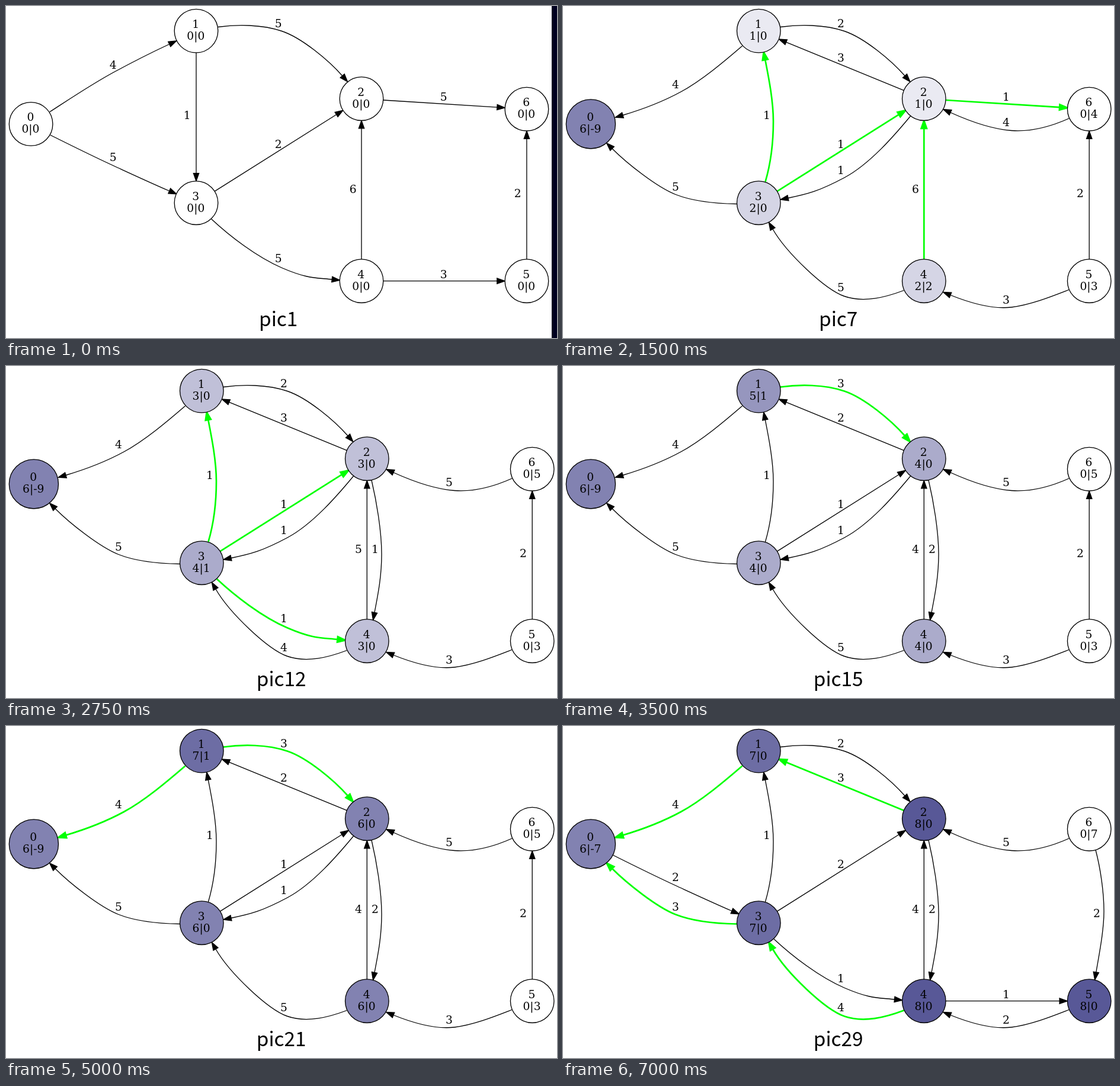
Write an HTML page with a canvas that moves like this. It is 930 px wide and 561 px high and loops after 7250 ms.

```html
<!DOCTYPE html>
<html lang="en">
<head>
<meta charset="utf-8">
<title>Push-relabel maximum flow</title>
<style>
  html, body { margin: 0; height: 100%; overflow: hidden; background: #fff; }
  canvas { display: block; }
</style>
</head>
<body>
<canvas id="stage" width="930" height="561"></canvas>
<script>
const ctx = document.getElementById('stage').getContext('2d');
const STEP = 250, RADIUS = 36.8, HEAD = 13.33;
const NODE_FONT = '18.67px "DejaVu Serif", "Noto Serif", serif';
const TITLE_FONT = '33.33px "Noto Sans CJK SC", "Noto Sans CJK JP", "Noto Sans", sans-serif';

const nodes = [[46.9, 199.4], [330.3, 42.1], [609.3, 156.7], [330.3, 332.7],
               [609.3, 464.7], [888.2, 464.7], [888.2, 174.2]];

// from, to, capacity, label position, label position of the reverse arc
const edges = [
  [0, 1, 4, 190, 100, 190, 133],
  [0, 3, 5, 190, 256, 190, 306],
  [1, 2, 5, 469, 30, 469, 88],
  [1, 3, 1, 315, 185, 344, 185],
  [2, 6, 5, 748, 154, 748, 197],
  [3, 2, 2, 469, 234, 469, 278],
  [3, 4, 5, 469, 427, 469, 476],
  [4, 2, 6, 595, 310, 623, 310],
  [4, 5, 3, 748, 454, 748, 497],
  [5, 6, 2, 873, 317, 901, 317]
];

// Arcs that are not straight lines between their nodes
const curves = {
  '0-1': 'M83 179 C114 159 154 132 191 112 S256 78 285 64.5',
  '0-3': 'M84 218 C114 233 154 253 191 270 S256 300 285 312.5',
  '1-0': 'M302.5 67.5 C273 93 234 126 199 145 S133 175 101 184.5',
  '3-0': 'M293 334.5 C260 334 222 331 190 318.5 S107 265 83 241',
  '1-2': 'M367 35.5 C400 31 441 31 475 42.5 S554 92 577 118',
  '3-1': 'M341.5 297 C350 268 355 230 355 195 S347 120 341.3 91',
  '2-3': 'M586.5 186 C560 218 518 267 475 290 S412 318 380 324.5',
  '3-4': 'M356 360 C386 388 432 424 475 442.5 S531 459 559.5 462',
  '4-3': 'M575.5 480.5 C545 492 508 502 475 490.5 S377 417 354 377',
  '2-4': 'M617 193 C625 227 634 278 634 318 S627 390 622 416.5',
  '5-4': 'M854 479.5 C827 490 790 505 757 509 S685 501 654 488.5',
  '6-2': 'M854 190 C825 203 791 213 757 210.5 S685 194 654 180',
  '6-5': 'M899 209.5 C907 240 913 280 913 313 S905 385 899.8 416'
};

function straight(u, v) {
  const [x1, y1] = nodes[u], [x2, y2] = nodes[v];
  const length = Math.hypot(x2 - x1, y2 - y1);
  const at = d => `${x1 + (x2 - x1) * d / length} ${y1 + (y2 - y1) * d / length}`;
  return `M${at(RADIUS)} L${at(length - RADIUS - HEAD)}`;
}

function makeArc(u, v, x, y) {
  const d = curves[`${u}-${v}`] || straight(u, v);
  const [px, py, ex, ey] = d.match(/[\d.]+/g).slice(-4).map(Number);
  const length = Math.hypot(ex - px, ey - py);
  const dx = (ex - px) / length, dy = (ey - py) / length, w = 0.35 * HEAD;
  const head = new Path2D(`M${ex - dy * w} ${ey + dx * w} L${ex + dx * HEAD} ${ey + dy * HEAD}
    L${ex + dy * w} ${ey - dx * w} Z`);
  return { u, v, x, y, line: new Path2D(d), head };
}

const arcs = edges.flatMap(([u, v, , x, y, bx, by]) => [makeArc(u, v, x, y), makeArc(v, u, bx, by)]);

// Relabel-to-front push-relabel; a state is kept at the start, at each relabel and at the end
function solve() {
  const height = nodes.map(() => 0), excess = nodes.map(() => 0);
  const residual = edges.flatMap(e => [e[2], 0]);
  const states = [];
  const save = () => states.push({ height: [...height], excess: [...excess], residual: [...residual] });
  const leaving = u => arcs.map((_, i) => i).filter(i => arcs[i].u === u).reverse();

  function push(i, amount) {
    residual[i] -= amount;
    residual[i ^ 1] += amount;
    excess[arcs[i].u] -= amount;
    excess[arcs[i].v] += amount;
  }

  function discharge(u) {
    while (excess[u] > 0) {
      const open = () => leaving(u).filter(i => residual[i] > 0);
      for (const i of open())
        if (excess[u] > 0 && height[u] === height[arcs[i].v] + 1) push(i, Math.min(excess[u], residual[i]));
      if (excess[u] > 0) {
        height[u] = 1 + Math.min(...open().map(i => height[arcs[i].v]));
        save();
      }
    }
  }

  save();
  height[0] = 6;
  leaving(0).forEach(i => push(i, residual[i]));
  const list = [1, 2, 3, 4, 5];
  for (let k = 0; k < list.length; k++) {
    const u = list[k], before = height[u];
    discharge(u);
    if (height[u] > before) {
      list.splice(k, 1);
      list.unshift(u);
      k = 0;
    }
  }
  save();
  return states;
}

const states = solve();

function drawArc(arc, amount, admissible) {
  ctx.strokeStyle = ctx.fillStyle = admissible ? '#0f0' : '#000';
  ctx.lineWidth = admissible ? 2.67 : 1.33;
  ctx.stroke(arc.line);
  ctx.fill(arc.head);
  ctx.stroke(arc.head);
  ctx.fillStyle = '#000';
  ctx.fillText(amount, arc.x, arc.y + 6.3);
}

function drawNode(id, x, y, r, height, excess) {
  const shade = height / 11;
  ctx.beginPath();
  ctx.arc(x, y, r, 0, 2 * Math.PI);
  ctx.fillStyle = `rgb(${255 - 230 * shade}, ${255 - 230 * shade}, ${255 - 143 * shade})`;
  ctx.fill();
  ctx.strokeStyle = '#000';
  ctx.lineWidth = 1.33;
  ctx.stroke();
  ctx.fillStyle = '#000';
  ctx.fillText(id, x - 0.7, y - 5.1);
  ctx.fillText(`${height}|${excess}`, x - 0.7, y + 14.9);
}

function draw(index) {
  const { height, excess, residual } = states[index];
  const narrow = index === 0;
  ctx.fillStyle = '#fff';
  ctx.fillRect(0, 0, 930, 561);
  ctx.textAlign = 'center';
  ctx.font = TITLE_FONT;
  ctx.fillStyle = '#000';
  ctx.fillText(`pic${index + 1}`, narrow ? 459.7 : 464.7, 541);

  ctx.save();
  ctx.font = NODE_FONT;
  if (narrow) ctx.translate(-9.3, 0);
  arcs.forEach((arc, i) => {
    if (residual[i] > 0) drawArc(arc, residual[i], height[arc.u] === height[arc.v] + 1);
  });
  nodes.forEach(([x, y], i) => {
    const wide = i === 0 && !narrow;
    drawNode(i, i === 0 && narrow ? x + 4.5 : x, y, wide ? 41.6 : RADIUS, height[i], excess[i]);
  });
  ctx.restore();

  if (narrow) {
    ctx.fillStyle = '#000020';
    ctx.fillRect(921, 0, 9, 561);
  }
}

function frame(now) {
  draw(Math.floor(now / STEP) % states.length);
  requestAnimationFrame(frame);
}
requestAnimationFrame(frame);
</script>
</body>
</html>
```
